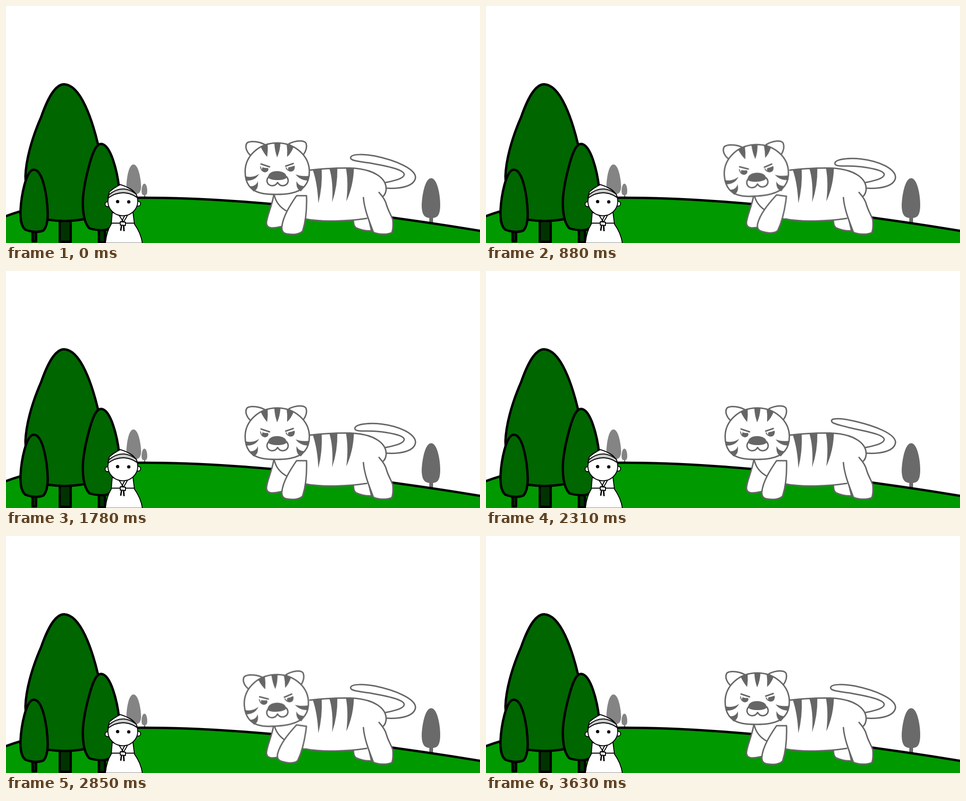
Recreate the animation shown at these times as an HTML page without scripts. Size 1000 by 501 pixels, loop 3660 ms.

```html
<!DOCTYPE html>
<html lang="en">
<head>
<meta charset="utf-8">
<title>Tiger on the hill</title>
<style>
  html, body { margin: 0; width: 100%; height: 100%; overflow: hidden; background: #fff; }
  svg { display: block; width: 100%; height: 100%; }
  .ground { fill: #090; stroke: #000; stroke-width: 5; }
  .tree { stroke: #000; stroke-width: 5; stroke-linejoin: round; fill: #060; }
  .trunk { fill: #030; }
  .boy { fill: #fff; stroke: #000; stroke-width: 2; stroke-linejoin: round; }
  .tiger { fill: #fff; stroke: #666; stroke-width: 3; stroke-linecap: round; stroke-linejoin: round; }
  .line { fill: none; }
  .mark { fill: #666; stroke: none; }
  .ink { fill: #000; stroke: none; }

  .tail { animation: sway 3660ms ease-in-out infinite; }
  .head { transform-origin: 572px 344px; animation: nod 1830ms ease-in-out infinite; }
  .paw { transform-origin: 625px 400px; animation: step 1830ms ease-in-out infinite; }
  .open { animation: hide 1830ms step-end infinite; }
  .shut { animation: show 1830ms step-end infinite; }

  @keyframes sway {
    0%, 77.9%, 100% { d: path("M801 385C830 387 862 382 864 362C863 344 822 326 778 317C756 313 727 312 727 321C727 328 750 329 768 332C795 337 842 345 840 357C838 366 815 370 797 374"); }
    10.4% { d: path("M801 385C830 387 862 382 864 362C863 344 828 328 784 321C760 318 732 318 732 328C732 334 758 332 776 335C800 338 842 345 840 357C838 366 815 370 797 374"); }
    24%, 48.6% { d: path("M801 385C830 387 862 382 864 362C863 344 830 328 792 323.5C766 320 736 324 736 333C736 341 762 337 782 339C805 341 842 347 840 357C838 366 815 370 797 374"); }
    63.1% { d: path("M801 385C830 387 862 382 864 362C863 344 822 328 780 318C756 312 728 309 729 317C729 323 748 326 766 331C795 338 842 345 840 357C838 366 815 370 797 374"); }
  }
  @keyframes nod {
    0%, 32%, 78%, 100% { transform: none; }
    42%, 66% { transform: translate(-2.3px, 3.5px) rotate(-4deg); }
  }
  @keyframes step {
    0%, 32%, 78%, 100% { transform: none; }
    42%, 66% { transform: rotate(8deg); }
  }
  @keyframes hide { 0%, 24.6% { opacity: 1; } 18% { opacity: 0; } }
  @keyframes show { 0%, 24.6% { opacity: 0; } 18% { opacity: 1; } }
</style>
</head>
<body>
<svg viewBox="0 0 1000 501" preserveAspectRatio="none">
  <!-- distant trees -->
  <g fill="#848484">
    <path d="M269 335C280 335 285 368 285 383C284 396 279 398 269 398C259 398 254 396 254 383C254 368 258 335 269 335Z"/>
    <path d="M292 375.500C296 375.500 298 384 298 391C298 398 296 400 292 400C288 400 286 398 286 391C286 384 288 375.500 292 375.500Z"/>
    <path d="M291 399h3v6h-3zM266 397h6v10h-6z"/>
  </g>
  <path fill="#6a6a6a" d="M897 364C911 364 917 405 916 424C915 443 910 447 901 448V460H893V448C884 447 878 443 877 424C877 405 883 364 897 364Z"/>

  <path class="ground" d="M-5 446C80 413 190 404 310 405.500C480 407 700 426 1005 476V520H-5Z"/>

  <g class="tree">
    <path class="trunk" d="M113.500 453h23v45.500h-23z"/>
    <path d="M123 165.500C103 165 87 198 74 235C53 283 42 328 41 360C42 405 60 450 90 452C118 456 140 455 162 451C190 446 205 390 205 350C204 325 198 308 194 292C182 242 158 167 123 165.500Z"/>
    <path class="trunk" d="M196 473h13v26.500h-13z"/>
    <path d="M201 291.500C221 293 235 350 238.500 385C241 430 232 474 205 474C195 474 185 473 176 470C165 459 162 437 162 414C163 382 171 352 178 328C183 311 190 291 201 291.500Z"/>
    <path class="trunk" d="M56 477h7.500v20.500h-7.500z"/>
    <path d="M59 346C78 347 87 402 88 439C88 457 84 469 79 474.500C66 480 52 477 41 473C33 467 30 451 30.500 434C32 402 42 346 59 346Z"/>
  </g>

  <g class="boy">
    <path d="M224 437L222 461C215 472 211 485 209.500 503H288C286 487 281 475 271 461L268 437Z"/>
    <path class="line" d="M222 459H271M239 443L248 457L256 443M250 444L244 456"/>
    <path d="M244 462L242 475M248 462L249 476" stroke-width="3"/>
    <path d="M241 456l11 1v7l-11-1z"/>
    <circle cx="214" cy="419" r="5"/>
    <circle cx="279" cy="418" r="5"/>
    <ellipse cx="246.500" cy="413" rx="31.500" ry="30.500"/>
    <path d="M215 406L218 393Q228 384 241 377.500Q257 382 268 391Q275 398 277 405Q246 384 215 406Z"/>
    <path fill="#ccc" d="M215 406L217 399Q246 375 275 398L277 405Q246 384 215 406Z"/>
    <circle class="ink" cx="235.500" cy="413.500" r="3.500"/>
    <circle class="ink" cx="259" cy="414" r="3.500"/>
    <path class="ink" fill-opacity=".45" d="M210 500h77v1h-77z"/>
  </g>

  <g class="tiger">
    <path class="tail" d="M801 385C830 387 862 382 864 362C863 344 822 326 778 317C756 313 727 312 727 321C727 328 750 329 768 332C795 337 842 345 840 357C838 366 815 370 797 374"/>
    <path d="M733 448C733 458 733 465 739 469C748 473 760 476 771 475L764 445Z"/>
    <path d="M565 399C561 424 550 444 549.500 459C550 472 565 470 582 466L600 430Z"/>
    <path stroke="none" d="M566 398C570 416 580 428 593 435L631 450C665 457 722 455 761 449L796 402C815 372 780 343 720 342.500Q680 342 636 347L600 380Z"/>
    <path class="line" d="M566 400C570 417 580 427 593 434M631 450C665 457 722 455 761 449M641 347Q680 342 725 342.500C775 344 803 363 802 388Q801 397 796 402"/>
    <path d="M754 405C756 430 766 454 775 478C784 483 804 484 814 479C817 471 817 463 816 452C813 443 806 432 803 421C801 412 795 403 787 394"/>
    <g class="mark">
      <path d="M647 346L666 344Q668 381 659 417Q657 374 647 346Z"/>
      <path d="M682 343L699 341.500Q700 380 688 415Q691 371 682 343Z"/>
      <path d="M717 342L734 342.500Q733 380 718 413Q723 372 717 342Z"/>
    </g>
    <path class="paw" d="M613 401H634C635 431 633 453 626 475C622 482 607 484 595 482C585 481 581 476 582 467C584 445 600 420 613 401Z"/>

    <g class="head">
      <path d="M516 316C507 308 503 296 509 289C518 284 536 287 548 294L530 320Z"/>
      <path d="M597 291C612 284 628 283 633 290C636 299 632 308 627 315L610 316Z"/>
      <path d="M572 289.500C610 289.500 640 317 640 350C640 380 622 392 600 396C585 399 555 399 540 396C520 392 504.500 380 504.500 350C504.500 317 534 289.500 572 289.500Z"/>
      <g class="mark">
        <path d="M537 297L552 291Q553 305 551 319Q544 312 537 297Z"/>
        <path d="M566 290H579Q578 307 572 320Q567 306 566 290Z"/>
        <path d="M592 291L607 297Q602 311 593 319Q594 305 592 291Z"/>
        <path d="M506 360Q520 364 534 355Q526 370 507 369Z"/>
        <path d="M513 381Q528 382 531 370Q534 387 522 392Z"/>
        <path d="M639 359Q624 361 611 356Q621 369 638 369Z"/>
        <path d="M613 370Q617 381 631 381L622 392Q611 386 613 370Z"/>
      </g>
      <path d="M554 361C547 370 552 379 561 380Q569 380 573 373Q577 380 584 380C594 379 599 370 592 361Z"/>
      <path class="mark" d="M553 362C553 353 562 349 572 349C583 349 592 354 592 362C590 370 556 370 553 362Z"/>
      <g class="open">
        <path class="line" d="M538 334L556 340M606 333L590 338.500"/>
        <path class="line" stroke-width="2" d="M537 340Q538 349 546 350.500M591 342Q593 348 600 349"/>
        <path class="mark" d="M536 339L541 341Q548 343 553 342.500C555 347 552 351.500 546 351.500C540 351 539 346 541 341Z"/>
        <path class="mark" d="M590 342Q600 341 609 337.500C610 345 607 350 601 350C595 349 594 345 596 341Z"/>
      </g>
      <g class="shut mark">
        <path d="M534 348Q545 344 556 347V349Q544 351 534 348Z"/>
        <path d="M589 347Q600 344 610 348Q600 351 589 349Z"/>
      </g>
    </g>
  </g>
</svg>
</body>
</html>
```
